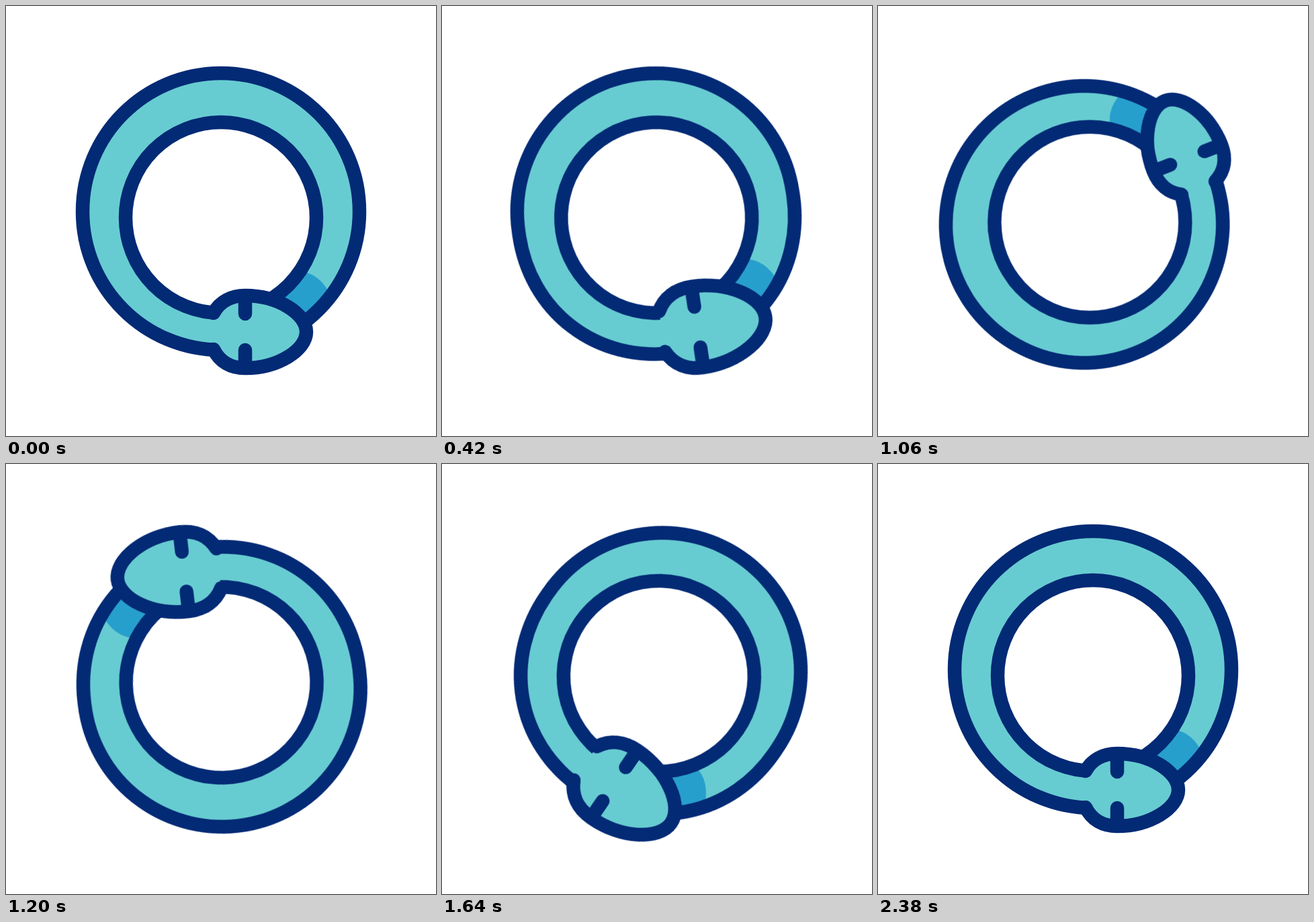
An HTML page that plays this animation: 640x640 px, repeating every 2.4 s.

```html
<!DOCTYPE html>
<html lang="en">
<head>
<meta charset="utf-8">
<title>Circling snake</title>
<style>
  html, body { margin: 0; width: 100%; height: 100%; overflow: hidden; background: #fff; }
  svg { display: block; width: 640px; height: 640px; }

  .line { fill: none; stroke: #032a75; stroke-width: 20.5; stroke-linecap: round; stroke-linejoin: round; }
  .skin { fill: #67ccd1; }
  .tail { fill: #279fcc; }
  .hole { fill: #fff; }

  .snake { transform-origin: 320px 320px; animation: spin 2400ms infinite; }
  .head { transform-origin: 356px 485px; animation: swell 2400ms infinite; }
  .head path { vector-effect: non-scaling-stroke; }
  .back { animation: bulge 2400ms infinite; }

  @keyframes spin {
    0% { transform: rotate(0deg); animation-timing-function: cubic-bezier(.75, 0, .25, 1); }
    99.17%, 100% { transform: rotate(-360deg); }
  }

  /* swell and bulge share the same two-beat rhythm */
  @keyframes swell {
    0% { transform: scale(1); animation-timing-function: cubic-bezier(.37, 0, .63, 1); }
    20% { transform: scale(1.13); animation-timing-function: cubic-bezier(.5, 0, .75, .5); }
    44% { transform: scale(1); animation-timing-function: cubic-bezier(.2, .6, .4, 1); }
    60% { transform: scale(1.13); }
    66.7% { transform: scale(1.13); animation-timing-function: cubic-bezier(.37, 0, .63, 1); }
    83.3%, 100% { transform: scale(1); }
  }
  @keyframes bulge {
    0% { d: path("M114 306C114 192.2 206.2 100 320 100C433.8 100 526 192.2 526 306C526 419.8 433.8 512 320 512C206.2 512 114 419.8 114 306Z"); animation-timing-function: cubic-bezier(.37, 0, .63, 1); }
    20% { d: path("M114 306C114 192.2 206.2 100 320 100C433.8 100 526 192.2 526 306C529 425 440 518 320 518C200 518 111 425 114 306Z"); animation-timing-function: cubic-bezier(.5, 0, .75, .5); }
    44% { d: path("M114 306C114 192.2 206.2 100 320 100C433.8 100 526 192.2 526 306C526 419.8 433.8 512 320 512C206.2 512 114 419.8 114 306Z"); animation-timing-function: cubic-bezier(.2, .6, .4, 1); }
    60% { d: path("M114 306C114 192.2 206.2 100 320 100C433.8 100 526 192.2 526 306C529 425 440 518 320 518C200 518 111 425 114 306Z"); }
    66.7% { d: path("M114 306C114 192.2 206.2 100 320 100C433.8 100 526 192.2 526 306C529 425 440 518 320 518C200 518 111 425 114 306Z"); animation-timing-function: cubic-bezier(.37, 0, .63, 1); }
    83.3%, 100% { d: path("M114 306C114 192.2 206.2 100 320 100C433.8 100 526 192.2 526 306C526 419.8 433.8 512 320 512C206.2 512 114 419.8 114 306Z"); }
  }
</style>
</head>
<body>
<svg viewBox="0 0 640 640">
  <g class="snake">
    <path class="skin back" d="M114 306C114 192.2 206.2 100 320 100C433.8 100 526 192.2 526 306C526 419.8 433.8 512 320 512C206.2 512 114 419.8 114 306Z"/>
    <path class="tail" d="M441 395Q471 401 484 434L452 464L405 430Z"/>
    <path class="line back" d="M114 306C114 192.2 206.2 100 320 100C433.8 100 526 192.2 526 306C526 419.8 433.8 512 320 512C206.2 512 114 419.8 114 306Z"/>
    <circle class="line hole" cx="320" cy="315" r="142"/>
    <g class="head">
      <path class="line skin" d="M309 457C318 440 335 431 356 431C405 431 447 458 447 485C447 512 405 539 356 539C335 539 318 530 309 511"/>
      <path class="line" d="M356 434V458M356 512V536"/>
    </g>
  </g>
</svg>
</body>
</html>
```
